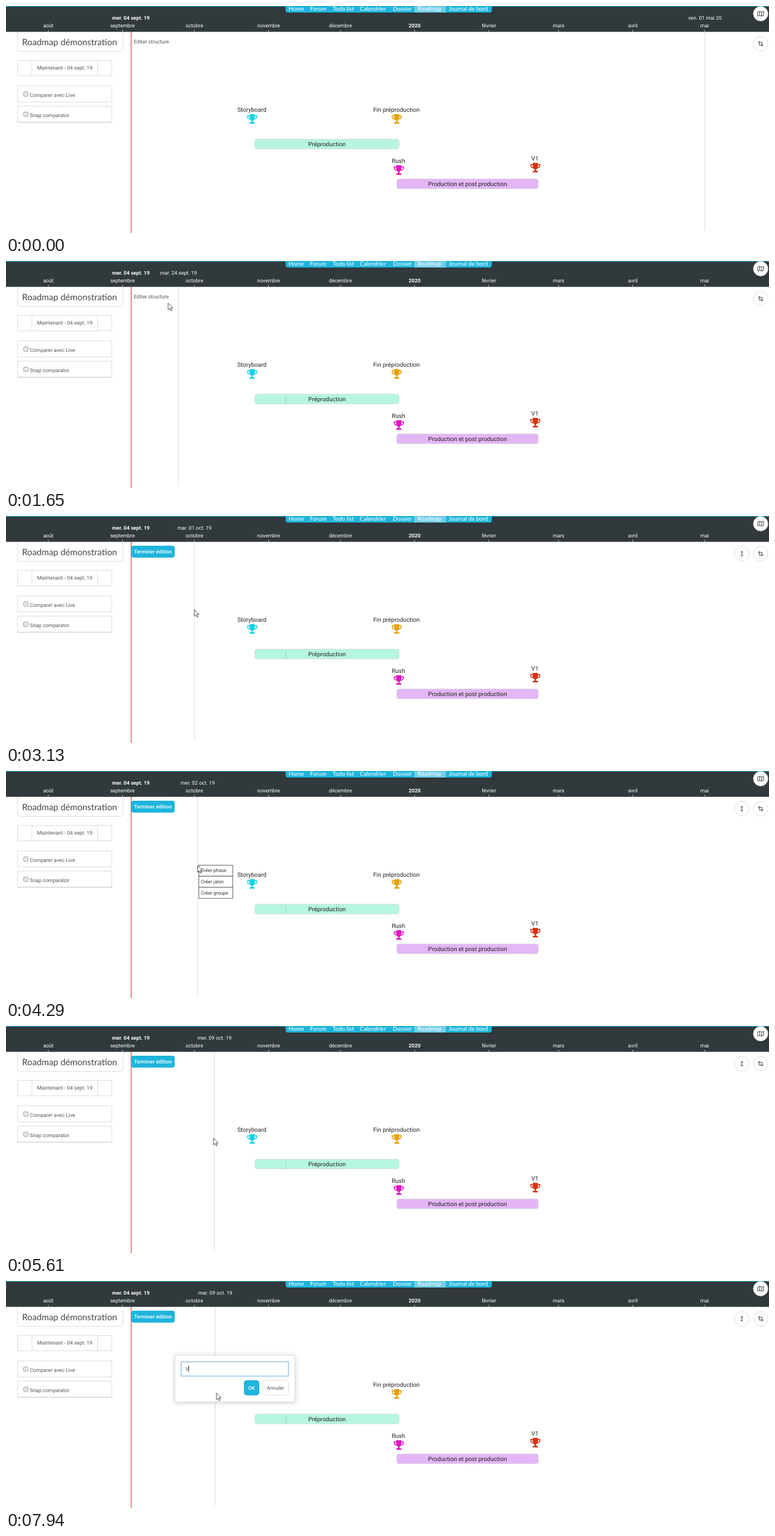
An HTML page for the animation above (8000 ms loop, 1280 by 382 pixels).

```html
<!DOCTYPE html>
<html lang="fr">
<head>
<meta charset="utf-8">
<title>Roadmap démonstration</title>
<style>
  html, body { margin: 0; width: 100%; height: 100%; overflow: hidden; background: #fff; }
  svg { display: block; font: 8.67px Roboto, Arial, sans-serif; text-rendering: geometricPrecision; }
  .mid { text-anchor: middle; }
  .bold { font-weight: 700; }
  .medium { font-weight: 500; }
  .label { font-size: 10px; fill: #222; }
  .side { fill: #555; }
  .item { font-size: 8px; fill: #333; }
  .nav { font: 500 9.65px Lato, sans-serif; fill: #fff; }
  .title { font: 14.8px Lato, sans-serif; fill: #444; }
  .white { fill: #fff; }
  .box { fill: #fff; stroke: #ddd; }
  .icon { fill: none; stroke: #444; stroke-width: 1; }
  .blue { fill: #1eb5dc; }
  .pointer { fill: #fff; stroke: #222; stroke-width: .8; stroke-linejoin: round; }
  #popup .box { filter: drop-shadow(0 1px 4px rgba(0, 0, 0, .18)); }
</style>
</head>
<body>
<svg id="stage" width="1280" height="382" viewBox="0 0 1280 382"></svg>
<script>
const LOOP = 8000;
const DAY = 4.016;      // pixels per day
const OCTOBER = 316;    // x of 1 October 2019
const stage = document.getElementById('stage');

function add(parent, tag, attrs, content) {
  const node = document.createElementNS('http://www.w3.org/2000/svg', tag);
  for (const key in attrs) node.setAttribute(key, attrs[key]);
  if (content) node.textContent = content;
  return parent.appendChild(node);
}
const group = (parent = stage, attrs = {}) => add(parent, 'g', attrs);
const rect = (parent, x, y, width, height, attrs) =>
  add(parent, 'rect', { x, y, width, height, ...attrs });
const path = (parent, d, attrs) => add(parent, 'path', { d, ...attrs });
const text = (parent, x, y, content, cls) =>
  add(parent, 'text', { x, y, class: cls }, content);

// Left panel
path(stage, 'M19.5 40V72.5a4 4 0 0 0 4 4H192a4 4 0 0 0 4-4V40', { class: 'box' });
text(stage, 27, 66, 'Roadmap démonstration', 'title');
for (const [y, h] of [[91.5, 26], [134.5, 27], [168.5, 27]]) {
  rect(stage, 19.5, y, 158, h, { class: 'box' });
}
path(stage, 'M43.5 91.5v26M153.5 91.5v26', { stroke: '#ddd' });
path(stage, 'M19 195.5h159', { stroke: '#c4c4c4' });
text(stage, 98.5, 107.2, 'Maintenant - 04 sept. 19', 'side mid');
text(stage, 40, 152.7, 'Comparer avec Live', 'side');
text(stage, 40, 186.7, 'Snap comparator', 'side');
for (const y of [144.5, 178.5]) {
  rect(stage, 29.5, y, 7.5, 7.5, { rx: 1.2, fill: '#e6e6e6', stroke: '#999', 'stroke-width': .9 });
}

// Phases
function phase(x, y, width, color, name) {
  rect(stage, x, y, width, 16.5, { rx: 4, fill: color, stroke: '#d4d8d8', 'stroke-width': .8 });
  text(stage, x + width / 2, y + 12, name, 'label mid');
}
phase(417.5, 224, 242, '#b6f5de', 'Préproduction');
phase(655.5, 291, 237.5, '#e4b6f6', 'Production et post production');
const mark = path(stage, 'M469.5 228v12', { stroke: '#93d3ba' });

// Milestones
function milestone(x, y, color, name, nameX) {
  text(stage, nameX, y - 12.5, name, 'label mid');
  const cup = group(stage, { transform: `translate(${x} ${y}) scale(.95 1) translate(-9 -8)` });
  path(cup, 'M4.5 0h9v5.5c0 3.5-2.2 5.2-3.4 5.6v2.2h1.4c1.5 0 2.2.8 2.2 2.7H4.3c0-1.9.7-2.7 2.2-2.7h1.4v-2.2C6.7 10.7 4.5 9 4.5 5.5z', { fill: color });
  path(cup, 'M4.5 2.9H1v1.7c0 2 2 3.5 4.4 3.8M13.5 2.9H17v1.7c0 2-2 3.5-4.4 3.8', { fill: 'none', stroke: color, 'stroke-width': 1.6 });
}
milestone(413, 190, '#12d2e6', 'Storyboard', 412.5);
milestone(655.5, 190, '#e6a10c', 'Fin préproduction', 655);
milestone(659, 276, '#e312c4', 'Rush', 658.3);
milestone(888, 272, '#df2f0a', 'V1', 887.3);

// Time lines
const dateLine = path(stage, 'M0 43V378', { stroke: '#000', 'stroke-opacity': .14 });
path(stage, 'M210 43V382', { stroke: '#cf4440', 'stroke-width': 1.2 });

// Structure button, off and on
const editOff = text(stage, 214.5, 63.2, 'Editer structure', 'side');
const editOn = group();
rect(editOn, 210, 50, 73, 20, { rx: 4, class: 'blue' });
text(editOn, 246.5, 63.2, 'Terminer édition', 'white medium mid');

// Header
rect(stage, 0, 0, 1280, 43.5, { fill: '#31393c' });
rect(stage, 0, 0, 1280, 1, { class: 'blue' });
const months = [['août', 71], ['septembre', 195.5], ['octobre', 316], ['novembre', 440.5],
  ['décembre', 561], ['2020', 685.5], ['février', 810], ['mars', 927], ['avril', 1051.5], ['mai', 1172]];
for (const [name, x] of months) {
  text(stage, x, 36.2, name, 'white mid' + (name === '2020' ? ' bold' : ''));
  path(stage, `M${x} 40v3.5`, { stroke: '#ddd', 'stroke-width': .8 });
}
text(stage, 209.5, 22.8, 'mer. 04 sept. 19', 'white bold mid');
const dateText = text(stage, 0, 22.8, '', 'white mid');

path(stage, 'M469 0H815V7a4 4 0 0 1-4 4H473a4 4 0 0 1-4-4z', { class: 'blue' });
rect(stage, 685, 0, 53, 11, { fill: '#72cee8' });
const tabs = [['Home', 474], ['Forum', 510], ['Todo list', 548], ['Calendrier', 593.5],
  ['Dossier', 649], ['Roadmap', 690.5], ['Journal de bord', 742.5]];
for (const [name, x] of tabs) text(stage, x, 8, name, 'nav');

// Round buttons
function roundButton(x, y, icon) {
  const button = group(stage, { transform: `translate(${x} ${y})` });
  add(button, 'circle', { r: 12.2, class: 'box' });
  path(button, icon, { class: 'icon' });
  return button;
}
roundButton(1266, 13, 'M-5-2.8L-1.7-4 1.7-2.8 5-4V2.8L1.7 4-1.7 2.8-5 4zM-1.7-4V2.8M1.7-2.8V4');
roundButton(1266, 63.5, 'M-2.3-4.5V2.3H4.5M-4.5-2.3H2.3V4.5');
const moveButton = roundButton(1234.5, 63.5, 'M0-4V4M-1.8-2.4L0-4.2 1.8-2.4M-1.8 2.4L0 4.2 1.8 2.4');

// Context menu
const menu = group();
const items = ['Créer phase', 'Créer jalon', 'Créer groupe'].map((name, i) => {
  const y = 158.5 + i * 18.6;
  const back = rect(menu, 323.5, y, 57, 18.6, { stroke: '#555', 'stroke-width': .9 });
  text(menu, 327, y + 11.8, name, 'item');
  return back;
});

// Name dialog
const popup = group(stage, { id: 'popup' });
rect(popup, 283.5, 125, 201, 78.3, { class: 'box' });
rect(popup, 294, 136, 179.7, 24, { fill: '#fff', stroke: '#7db5e4', 'stroke-width': 1.2 });
const hint = text(popup, 301, 151.2, 'Saisissez un nom');
hint.style.fill = '#b5b5b5';
const typed = text(popup, 301, 151.2, 'V', 'side');
const caret = path(popup, 'M0 142.5v10.5', { stroke: '#222', 'stroke-width': .9 });
rect(popup, 399, 167, 26, 25.5, { rx: 5, class: 'blue' });
text(popup, 412, 182.9, 'OK', 'white medium mid');
rect(popup, 430.3, 167.5, 43.7, 24.7, { rx: 5, fill: '#fff', stroke: '#ddd' });
text(popup, 452, 182.9, 'Annuler', 'side mid');

// Pointer
const pointer = group(stage, { class: 'pointer' });
const arrow = path(pointer, 'M0 0V11.2L2.6 8.8 4.4 12.9 6.2 12.1 4.5 8.1H8z');
const hand = path(pointer, 'M-1.2 8V1.1a1.15 1.15 0 0 1 2.3 0V5.2L4.6 5.8Q6.6 6.2 6.5 8L5.8 11.2V13.6H-.5V12L-3.8 8.4Q-4.2 6.6-2.4 7.1z');

// Tracks: time, then values
const pointerTrack = [
  [530, 1130, 370], [820, 640, 268], [1080, 400, 160], [1310, 300, 95], [1650, 272, 71],
  [2120, 246, 61], [2500, 246, 61], [2950, 306, 148], [3130, 316, 157.5], [4210, 316, 157.5],
  [4710, 350, 168], [5080, 349, 168], [5300, 345.5, 169], [5710, 349, 195], [6000, 351, 219],
  [6220, 351.5, 204], [6450, 356, 188], [6650, 359, 181], [6780, 355.5, 182],
  [6960, 355.5, 182], [7130, 353, 188.5]];
const lineTrack = [
  [530, 1172.5], [820, 665.7], [1080, 440], [1310, 310], [1650, 289.5], [2120, 242],
  [2950, 250], [3130, 316.2], [4210, 316.2], [4710, 350], [5080, 349.5], [5300, 345.5],
  [5710, 351], [6220, 351.7], [6650, 351]];

function sample(track, t) {
  const next = track.findIndex(key => key[0] > t);
  if (next < 0) return track[track.length - 1].slice(1);
  if (next === 0) return track[0].slice(1);
  const a = track[next - 1], b = track[next];
  const k = (t - a[0]) / (b[0] - a[0]);
  return a.slice(1).map((v, i) => v + (b[i + 1] - v) * k);
}

const weekdays = ['dim.', 'lun.', 'mar.', 'mer.', 'jeu.', 'ven.', 'sam.'];
const shortMonths = ['janv.', 'févr.', 'mars', 'avr.', 'mai', 'juin', 'juil.', 'août', 'sept.', 'oct.', 'nov.', 'déc.'];
function dateAt(x) {
  const date = new Date(2019, 9, 1 + Math.floor((x - OCTOBER) / DAY));
  const day = String(date.getDate()).padStart(2, '0');
  return `${weekdays[date.getDay()]} ${day} ${shortMonths[date.getMonth()]} ${date.getFullYear() % 100}`;
}

const show = (node, on) => { node.style.display = on ? '' : 'none'; };
const inside = (x, y, left, top, right, bottom) => x >= left && x < right && y >= top && y < bottom;

function draw(t) {
  const [x, y] = sample(pointerTrack, t);
  const [lineX] = sample(lineTrack, t);
  const editing = t >= 2350;
  const menuOpen = t >= 3720 && t < 5500;
  const hasName = t >= 7940;

  dateLine.setAttribute('transform', `translate(${lineX} 0)`);
  dateText.setAttribute('x', lineX);
  dateText.textContent = dateAt(lineX);
  show(mark, t >= 1080);

  show(editOff, !editing);
  show(editOn, editing);
  show(moveButton, editing);

  show(menu, menuOpen);
  const row = menuOpen && inside(x, y, 323, 158, 381, 214) ? Math.floor((y - 158) / 18.6) : -1;
  items.forEach((item, i) => item.setAttribute('fill', i === row ? '#dfdfdf' : '#fff'));

  const fade = Math.min(1, Math.max(0, (t - 6010) / 400));
  show(popup, fade > 0);
  popup.setAttribute('opacity', fade);
  show(hint, !hasName);
  show(typed, hasName);
  show(caret, hasName || Math.floor((t - 6010) / 530) % 2 === 0);
  caret.setAttribute('transform', `translate(${hasName ? 306.6 : 301.3} 0)`);

  const overLink = row >= 0 || inside(x, y, 210, 50, 283, 70);
  show(pointer, t >= 530);
  pointer.setAttribute('transform', `translate(${x} ${y})`);
  show(arrow, !overLink);
  show(hand, overLink);
}

const start = performance.now();
function tick() {
  draw((performance.now() - start) % LOOP);
  requestAnimationFrame(tick);
}
tick();
</script>
</body>
</html>
```
